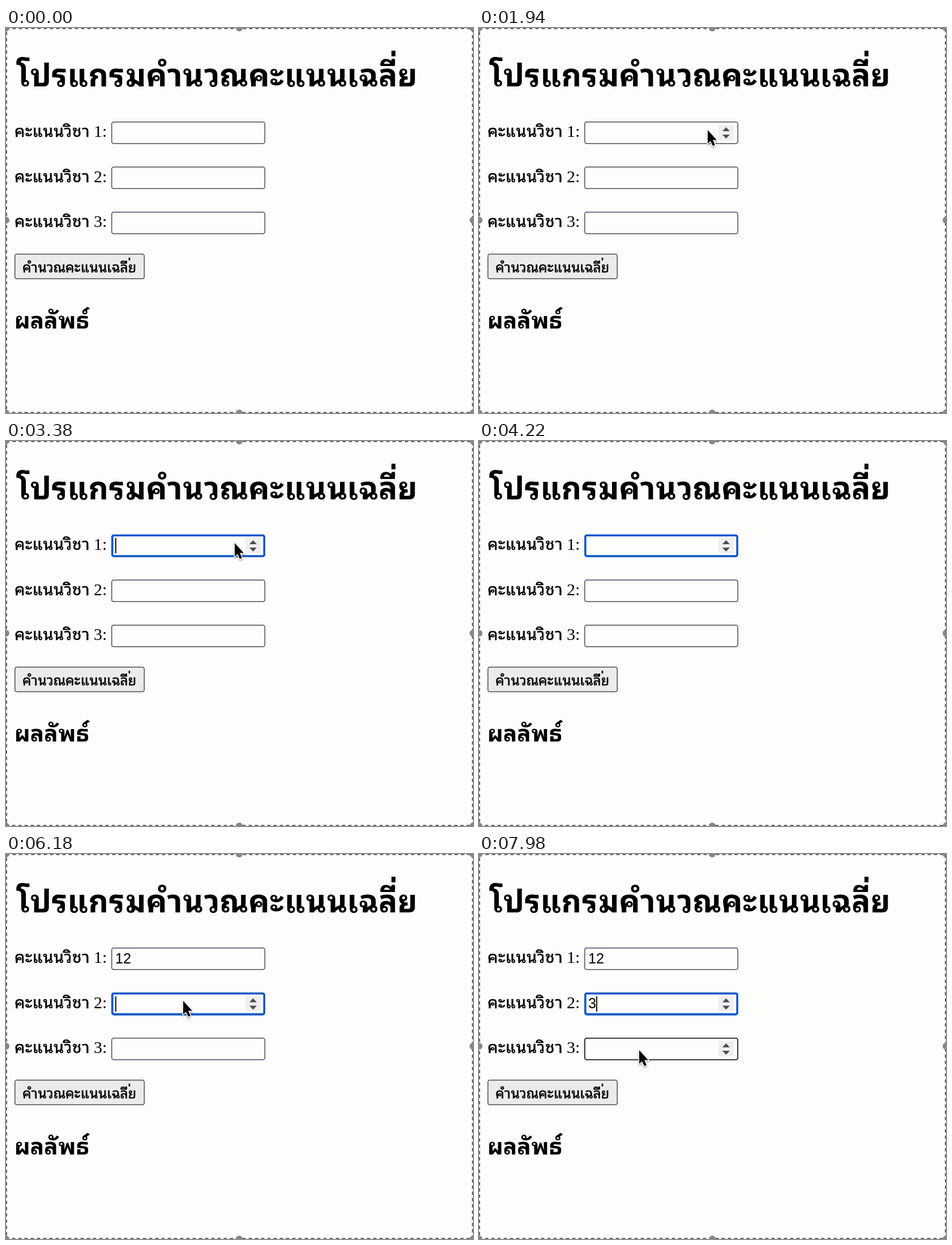
Write an HTML page that moves like this. It is 825x679 px and loops after 8000 ms.

```html
<!DOCTYPE html>
<html lang="th">
<head>
<meta charset="utf-8">
<title>โปรแกรมคำนวณคะแนนเฉลี่ย</title>
<style>
html, body { margin: 0; width: 100%; height: 100%; overflow: hidden; background: #fdfdfc; }
svg { display: block; width: 825px; height: 679px; }

.thai { font-family: 'Noto Sans Thai Looped', 'Noto Looped Thai', 'Loma', 'Noto Sans Thai', 'Noto Sans', sans-serif; }
.title, .subtitle { font-weight: 700; }
.title { font-size: 55.1px; }
.subtitle { font-size: 40.6px; }
.label { font-size: 28.8px; }
.button { font-size: 24.3px; }
.label, .button { stroke: #000; stroke-width: .6; }
.tone { stroke: #000; }
.number { font: 30px 'Liberation Serif', serif; }
.value { font: 25.3px 'Liberation Sans', sans-serif; }

.edge { fill: none; stroke: #66666c; stroke-width: 3; stroke-dasharray: 6 5; }
.box { fill: #fdfdfc; stroke: #4c4c54; stroke-width: 1.5; }
.focus { fill: none; stroke: #0c55cd; stroke-width: 3.6; }
.hover { fill: none; stroke: #1c1c20; stroke-width: 1.6; }
.caret { fill: #000; }
.cursor { stroke: #fff; stroke-width: 3; stroke-linejoin: round; paint-order: stroke; filter: drop-shadow(0 2px 1.5px #0005); }

/* Hard switches share one 8 s clock. */
.switch { opacity: 0; animation: 8s step-end infinite; }
.focus1 { animation-name: focus1; }
.focus2 { animation-name: focus2; }
.spin1 { animation-name: spin1; }
.spin2 { animation-name: spin2; }
.spin3 { animation-name: spin3; }
.caret1 { animation-name: caret1; }
.caret2 { animation-name: caret2; }
.key1 { animation-name: key1; }
.key2 { animation-name: key2; }
.key3 { animation-name: key3; }
.pointer { animation-name: pointer; }
.path { animation: path 8s linear infinite; }

@keyframes focus1 { 0%, 72.25% { opacity: 0 } 26% { opacity: 1 } }
@keyframes focus2 { 0% { opacity: 0 } 72.25%, 100% { opacity: 1 } }
@keyframes spin1 { 0%, 72.25% { opacity: 0 } 17% { opacity: 1 } }
@keyframes spin2 { 0% { opacity: 0 } 66.5%, 100% { opacity: 1 } }
@keyframes spin3 { 0% { opacity: 0 } 97.5%, 100% { opacity: 1 } }
@keyframes key1 { 0% { opacity: 0 } 56.25%, 100% { opacity: 1 } }
@keyframes key2 { 0% { opacity: 0 } 59.25%, 100% { opacity: 1 } }
@keyframes key3 { 0% { opacity: 0 } 87%, 100% { opacity: 1 } }
@keyframes pointer {
  0%, 42.5%, 87% { opacity: 0 }
  9%, 62.5%, 94.5%, 100% { opacity: 1 }
}
@keyframes caret1 {
  0%, 32.25%, 48.75% { opacity: 0; transform: none }
  26%, 38.5%, 42.5%, 55% { opacity: 1; transform: none }
  56.25% { opacity: 1; transform: translateX(14px) }
  59.25%, 71.75% { opacity: 1; transform: translateX(28px) }
  65.5%, 72.25%, 100% { opacity: 0; transform: translateX(28px) }
}
@keyframes caret2 {
  0%, 78.5% { opacity: 0; transform: none }
  72.25%, 84.75% { opacity: 1; transform: none }
  87%, 99.5%, 100% { opacity: 1; transform: translateX(14px) }
  93.25% { opacity: 0; transform: translateX(14px) }
}
@keyframes path {
  0%, 9% { transform: translate(835px, 628px) }
  10.4% { transform: translate(747px, 547px) }
  15.5% { transform: translate(437px, 157px); animation-timing-function: ease-out }
  20%, 62.5% { transform: translate(402px, 177px) }
  64.5% { transform: translate(343px, 225px); animation-timing-function: ease-out }
  68%, 94.5% { transform: translate(311px, 256px); animation-timing-function: ease-out }
  99.7%, 100% { transform: translate(281px, 343px) }
}
</style>
</head>
<body>
<svg viewBox="0 0 825 679">
  <defs>
    <g id="field">
      <text class="thai label" x="15" y="192">คะแนนวิชา</text>
      <rect class="box" x="186.75" y="165.75" width="270.5" height="38" rx="3.5"/>
    </g>
    <g id="spinner">
      <rect x="423" y="171" width="27" height="27" fill="#efeff0"/>
      <path d="M430 182h13l-6.5-7zM430 188h13l-6.5 7z" fill="#4c4c50"/>
    </g>
    <rect id="ring" x="187.8" y="166.5" width="268.4" height="36.5" rx="3"/>
    <rect id="bar" x="193" y="171" width="1.8" height="27"/>
    <circle id="handle" r="6" fill="#85858b"/>
  </defs>

  <rect width="825" height="679" fill="#fdfdfc"/>
  <rect class="edge" x=".5" y=".5" width="824" height="678"/>
  <use href="#handle"/>
  <use href="#handle" x="412"/>
  <use href="#handle" x="825"/>
  <use href="#handle" y="339"/>
  <use href="#handle" x="825" y="339"/>
  <use href="#handle" y="679"/>
  <use href="#handle" x="412" y="679"/>
  <use href="#handle" x="825" y="679"/>

  <!-- The font sets the tone mark too low, so its raised stroke is drawn. -->
  <text class="thai title" x="18" y="103">โปรแกรมคำนวณคะแนนเฉลี่ย</text>
  <path class="tone" d="M684.5 40v10" stroke-width="7"/>

  <g>
    <use href="#field"/>
    <text class="number" x="155" y="192">1:</text>
    <use class="switch spin1" href="#spinner"/>
    <use class="switch focus focus1" href="#ring"/>
    <text class="value switch key1" x="193" y="192.5">1</text>
    <text class="value switch key2" x="207" y="192.5">2</text>
    <use class="switch caret caret1" href="#bar"/>
  </g>

  <g transform="translate(0 79.5)">
    <use href="#field"/>
    <text class="number" x="155" y="192">2:</text>
    <use class="switch spin2" href="#spinner"/>
    <use class="switch focus focus2" href="#ring"/>
    <text class="value switch key3" x="193" y="192.5">3</text>
    <use class="switch caret caret2" href="#bar"/>
  </g>

  <g transform="translate(0 159)">
    <use href="#field"/>
    <text class="number" x="155" y="192">3:</text>
    <g class="switch spin3">
      <use href="#spinner"/>
      <rect class="hover" x="186.75" y="165.75" width="270.5" height="38" rx="3.5"/>
    </g>
  </g>

  <rect x="15.75" y="398.75" width="228.5" height="43.5" rx="3.5" fill="#ebebed" stroke="#4c4c54" stroke-width="1.5"/>
  <text class="thai button" x="129.5" y="431" text-anchor="middle">คำนวณคะแนนเฉลี่ย</text>
  <path class="tone" d="M218 405v5" stroke-width="2.6"/>
  <text class="thai subtitle" x="15" y="529.5">ผลลัพธ์</text>

  <g class="switch pointer">
    <g class="path">
      <path class="cursor" d="M2 3V27L7 22.2L11 31L15 29.3L11 20.5H18Z"/>
    </g>
  </g>
</svg>
</body>
</html>
```
